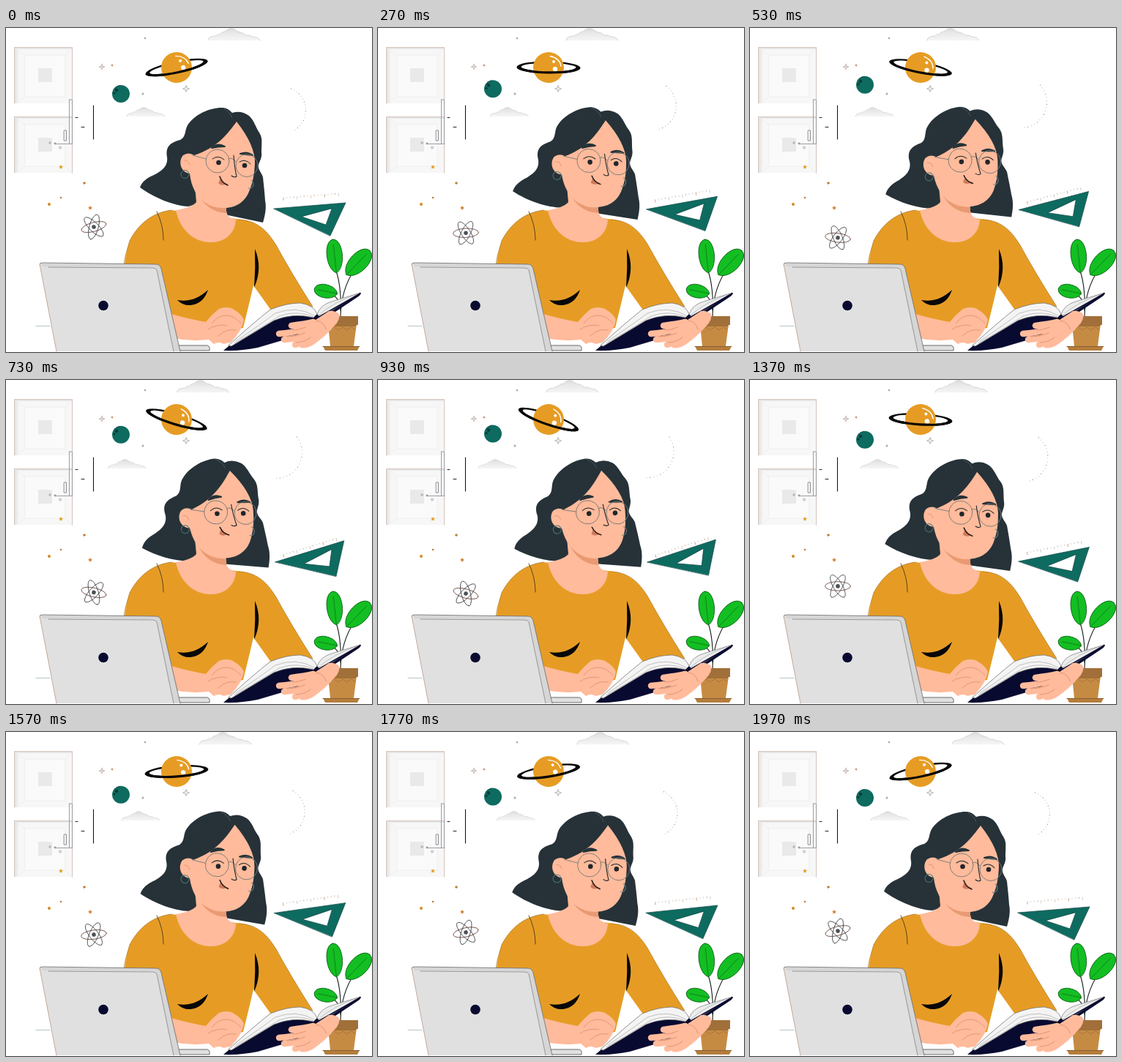
Write an HTML page with a canvas that moves like this. It is 500 by 443 pixels and loops after 2.01 s.

```html
<!DOCTYPE html>
<html lang="en">
<head>
<meta charset="utf-8">
<title>Study time</title>
<style>
html, body { margin: 0; width: 100%; height: 100%; overflow: hidden; background: #fff; }
canvas { display: block; width: 500px; height: 443px; }
</style>
</head>
<body>
<canvas id="stage" width="500" height="443"></canvas>
<script>
const c = document.getElementById('stage').getContext('2d');
const LOOP = 2010, STEP = 100 / 3, TAU = Math.PI * 2, DEG = Math.PI / 180;
const HAIR = '#263238', SKIN = '#ffbb9b', SHADE = '#e99a72', ORANGE = '#e69c24';
const TEAL = '#0e6b60', GREEN = '#13be22', NAVY = '#090a30', INK = '#20262b';

// time, swing, slope per ms
const KEYS = [
  [0, 0, .0015], [270, .415, .0014], [530, .737, .001],
  [930, 1, 0], [1170, .76, -.00125], [1570, .25, -.00095], [1970, 0, -.0003]
];

function swing(t) {
  let i = 0;
  while (i < KEYS.length - 2 && t > KEYS[i + 1][0]) i++;
  const [t0, a, m] = KEYS[i], [t1, b, n] = KEYS[i + 1];
  const d = t1 - t0, u = Math.min(1, (t - t0) / d), v = 1 - u;
  return a * v * v * (1 + 2 * u) + b * u * u * (3 - 2 * u) + d * u * v * (m * v - n * u);
}

function shape(d, fill, stroke, w = 1) {
  const p = new Path2D(d);
  if (fill) { c.fillStyle = fill; c.fill(p, 'evenodd'); }
  if (stroke) { c.strokeStyle = stroke; c.lineWidth = w; c.stroke(p); }
}
const line = (d, color, w) => shape(d, null, color, w);

function oval(x, y, rx, ry, rot, fill, stroke, w = 1) {
  c.beginPath();
  c.ellipse(x, y, rx, ry, rot * DEG, 0, TAU);
  if (fill) { c.fillStyle = fill; c.fill(); }
  if (stroke) { c.strokeStyle = stroke; c.lineWidth = w; c.stroke(); }
}
const dot = (x, y, r, fill, stroke, w) => oval(x, y, r, r, 0, fill, stroke, w);

function at(x, y, angle, draw) {
  c.save();
  c.translate(x, y);
  c.rotate(angle * DEG);
  draw();
  c.restore();
}

function star(x, y, r, n, inner, fill, stroke) {
  c.beginPath();
  for (let i = 0; i < n * 2; i++) {
    const a = i * Math.PI / n - Math.PI / 2, q = i % 2 ? r * inner : r;
    c.lineTo(x + q * Math.cos(a), y + q * Math.sin(a));
  }
  c.closePath();
  c.fillStyle = fill;
  c.fill();
  if (stroke) { c.strokeStyle = stroke; c.lineWidth = .6; c.stroke(); }
}

function frame(y) {
  at(11, y, 0, () => {
    const g = c.createLinearGradient(0, 0, 7, 0);
    g.addColorStop(0, '#dedede');
    g.addColorStop(1, '#f7f7f7');
    c.fillStyle = g;
    c.fillRect(0, 0, 80, 77);
    c.fillStyle = '#e6e6e6';
    c.fillRect(0, 0, 80, 3);
    line('M.5 77V.5H79.5V77', '#d3c3bc', 1);
    shape('M15 11H70V68H15Z', '#fafafa', '#efefef');
    line('M3 3L15 11M78 3L70 11M3 76L15 68M78 76L70 68', '#f0f0f0', 1);
    c.fillStyle = '#e9e9e9';
    c.fillRect(33, 29, 19, 19);
  });
}

function scenery() {
  frame(26);
  frame(121);
  line('M119.5 106V152', '#15171c', 1.1);
  line('M86.5 98V158M86.5 98H90.5V158M67 158.5H91', '#9a9da2', 1);
  line('M95 122.5H98M103 135.5H107', '#222', 1);
  line('M79.5 140H82.5V154H79.5Z', '#8e9194', 1);
  dot(60, 157, 1.2, null, '#999', .8);
  dot(67, 158, 1.4, '#999');
  dot(74, 163.5, 1.5, null, '#999', .8);
  line('M41 407.5H60', '#b8c5c8', 1);
  star(131, 53, 4, 4, .4, '#e5d9d5', '#b5a39d');
  star(246, 83, 4.5, 4, .4, '#eee', '#98908d');
  star(145, 51, 2, 4, .5, '#c98d78');
  dot(190, 14, 1.3, '#a8a8a8');
  dot(187, 90, 1.5, '#aaa');
  star(75, 190, 3, 5, .5, '#e3a01f');
  star(115, 246, 3, 5, .5, '#d4822d');
  dot(107, 212, 1.8, '#bd823d');
  dot(59, 241, 2, '#d18a26');
  dot(75, 232, 1.3, '#bf7b33');
}

function cloud(x, y, sx, sy) {
  c.save();
  c.translate(x, y);
  c.scale(sx, sy);
  const g = c.createLinearGradient(0, 0, 0, 17);
  g.addColorStop(0, '#dcdcdc');
  g.addColorStop(.5, '#ebebeb');
  g.addColorStop(1, '#f5f5f5');
  shape('M0 17Q0 12 8 11Q10 12 13 9Q16 10 19 6Q24 5 27 2Q33 -1 38 3Q41 6 45 6Q49 7 52 10Q57 9 61 12Q69 12 71 17Z', g);
  line('M0 17Q0 12 8 11Q10 12 13 9Q16 10 19 6Q24 5 27 2Q33 -1 38 3Q41 6 45 6Q49 7 52 10Q57 9 61 12Q69 12 71 17', '#c9c7c5', .7);
  c.restore();
}

function ring() {
  c.beginPath();
  c.ellipse(0, 0, 43.5, 8.5, 0, 0, TAU);
  c.ellipse(0, -.4, 37.5, 5.7, 0, 0, TAU);
  c.fillStyle = '#070707';
  c.fill('evenodd');
}

function planets(p) {
  at(233, 54, -12 + 31 * p, () => {
    ring();
    dot(0, 0, 21, ORANGE);
    line('M2 -15.5Q15 -13 17 -2', '#fff', 1.4);
    dot(7, -8, 2, '#fff');
    dot(9, 2, 3.2, '#fff');
    c.beginPath();
    c.rect(-45, 0, 90, 12);
    c.clip();
    ring();
  });
  at(157, 90 - 16.5 * p, 0, () => {
    dot(0, 0, 12, TEAL);
    dot(-6, -5, 2.2, '#083d3b');
    dot(-9, -1, 1.6, '#083d3b');
    line('M-9 -7A12 12 0 0 1 -2 -11.5', '#174c4a', 1);
  });
}

function atom(p) {
  at(120, 272 + 20 * p, -15 + 30 * p, () => {
    for (let i = 0; i < 3; i++) oval(0, 0, 17.5, 6.2, i * 60, null, i ? '#4b4d53' : '#765249', .9);
    dot(0, 0, 2.8, '#4e5056');
  });
}

function tools(p) {
  at(366 + 2 * p, 247 + 2 * p, -13.6 * p, () => {
    shape('M0 0L98 -8L77 37ZM38 11L71 22L79 0Z', TEAL, '#174a49', .7);
    const off = -14 + 8 * p;
    for (let i = 0; i < 17; i++) {
      const x = 13 + i * 4.7, y = off - x * .08;
      line(`M${x} ${y}v${i % 4 ? 1 : 3.5}`, i % 3 ? '#c9c0b9' : '#c39473', .8);
    }
  });
  at(377 - 9 * p, 112 - 15 * p, 35 * p, () => {
    const r = 32 + 4 * p;
    for (let i = 0; i < 17; i++) {
      const a = (-68 + i * 7.8) * DEG;
      c.fillStyle = i % 3 ? '#b9b9b9' : '#777';
      c.fillRect(r * Math.cos(a), r * Math.sin(a), 1, 1);
    }
  });
}

function plant() {
  line('M457 396Q459 356 451 332M457 394Q458 356 477 329M457 386Q456 368 443 363', '#15201a', 1.1);
  const leaf = (x, y, rx, ry, a) => at(x, y, a, () => {
    shape(`M0 ${-ry}C${rx * 1.3} ${-ry} ${rx * 1.4} ${ry * .7} 0 ${ry}C${-rx * 1.4} ${ry * .7} ${-rx * 1.3} ${-ry} 0 ${-ry}Z`, GREEN, '#12651c', .9);
    line(`M0 ${-ry * .7}V${ry}`, '#0b7a18', .8);
  });
  leaf(449, 312, 10.5, 23, -6);
  leaf(481, 321, 12, 23, 44);
  leaf(437, 360, 9, 16, -78);
  shape('M440 405H479L475 435H443Z', '#c58b43');
  line('M443 412L448 409L454 413L460 409L466 413L472 409L477 412', '#a1703a', .8);
  shape('M438 394H481V406H438Z', '#a1703a');
  line('M441 407H478', '#7c552c', 1);
  shape('M433 435H483L480 441H436Z', '#b47d3c');
  line('M433 435.5H483', '#8a5f30', 1);
}

function body() {
  shape('M226 249C197 253 180 270 169 291Q162 311 160 345L220 395L276 404L300 415L324 410Q332 378 338 352L365 390L419 381Q391 337 369 297C355 274 341 263 314 261Z', ORANGE);
  line('M226 249C197 253 180 270 169 291Q162 311 160 330M318 262C341 263 355 274 369 297Q391 337 419 381', '#b37c27', .8);
  line('M206 251Q215 269 215 290', '#4b3a22', .9);
  shape('M340 302Q351 328 339 355Q341 328 340 302Z', '#080808');
  shape('M234 372Q257 376 276 358Q270 377 252 379Q242 380 234 372Z', '#080808');
}

function hair() {
  shape('M297 109C281 108 258 117 248 133C244 140 246 149 238 153C223 157 218 163 220 176C222 190 211 196 204 200C192 205 186 210 183 218C202 232 229 243 249 244L270 238L294 254L351 266C354 256 356 246 354 236C353 222 352 214 351 204C349 197 344 194 345 187C347 181 350 177 349 170C349 157 351 151 346 143C341 136 339 126 332 120Q321 112 309 116Q304 110 297 109Z', HAIR);
  line('M297 110Q306 114 309 123', '#56616a', .7);
}

function neck() {
  shape('M257 205L260 238Q253 246 232 249C237 274 255 293 280 293C300 293 313 280 314 262Q302 260 301 250L298 225Z', SKIN);
  shape('M261 224Q274 242 301 245L301 253Q274 252 261 224Z', SHADE);
}

function face() {
  shape('M315 128C304 143 289 164 257 174Q249 169 242 174C235 182 238 197 251 199C253 218 261 231 271 238Q283 247 298 246C316 246 328 236 333 221Q339 207 340 186Q341 161 315 128Z', SKIN);
  line('M244 181Q249 180 251 187', SHADE, 1);
  dot(244.5, 200, 5.5, null, '#47767a', 1);
  line('M335 208A5 6 0 1 1 331 219', '#6b8588', 1);
  shape('M281 164Q289 156 299 162Q290 162 281 164Z', HAIR, HAIR, 2);
  shape('M320 172Q329 168 337 174Q329 173 320 172Z', HAIR, HAIR, 2);
  line('M282 179Q290 173 298 180M319 183Q327 178 334 186', INK, 1);
  dot(290.5, 184, 3.3, INK);
  dot(326, 188, 3.3, INK);
  dot(289, 182, 16, null, '#777978', .9);
  oval(329, 188, 15, 15.5, 0, null, '#777978', .9);
  line('M304 179Q309 176 314 183M255 174L273 179', '#777978', .9);
  line('M311 174Q312 190 315 203Q312 205 308 202', INK, 1.1);
  shape('M293 206Q296 213 303 213Q294 217 290 212Z', '#cf795d');
  line('M292 203Q295 212 303 215', '#231714', 1.5);
}

function laptop() {
  shape('M224 434H275Q279 435 278 441H222Z', '#e0e0e0', '#4b4b4b', .8);
  shape('M46 323Q46 321 50 321L205 323Q210 323 212 329L238 442H69Z', '#e0e0e0');
  shape('M205 323Q210 323 212 329L238 442H229L206 330Q205 327 200 327L50 326L47 322Z', '#d6d6d6');
  line('M46 323Q46 321 50 321L205 323Q210 323 212 329L238 442', '#666', .8);
  line('M58 327L200 328Q205 328 206 331L229 442', '#777', .7);
  line('M46 323L69 442', '#c5a99c', 1);
  dot(133, 379.5, 6.8, NAVY);
}

function reading() {
  shape('M222 390Q250 398 273 402Q282 391 291 384Q301 380 310 384Q322 391 325 399Q322 415 307 430L297 432Q291 428 284 432L277 426Q254 429 228 424Z', SKIN);
  line('M281 404Q290 392 302 393Q313 394 321 404M276 412Q289 404 302 407M290 421Q302 410 314 413', '#dc8e70', .8);
  shape('M297 441L322 420L366 394L424 392L484 362Q486 364 480 368L438 396L398 421L344 437Q320 442 297 441Z', NAVY);
  shape('M304 434Q337 404 361 385Q383 376 402 376Q421 379 425 391L420 396Q392 389 366 400L308 435Z', '#f4f4f4', '#666', .7);
  line('M314 428Q347 406 368 390Q397 379 421 393M312 431Q347 411 373 394Q397 385 420 395', '#aaa', .7);
  shape('M425 391Q430 378 445 374L484 362L430 396Z', '#ededed', '#777', .7);
  line('M427 393Q446 375 482 363', '#aaa', .7);
  line('M424 397L484 363', NAVY, 1.8);
  line('M390 407Q407 405 420 402M373 418Q390 417 406 412M380 426Q396 425 410 420M395 433Q405 431 414 426', SKIN, 8.5);
  shape('M398 408Q412 403 423 399L441 387Q449 386 455 391Q457 399 448 408Q436 422 420 433Q410 439 402 437Z', SKIN);
  line('M391 413Q401 413 409 409M384 422Q397 422 408 417M396 430Q408 430 416 423M424 400Q435 402 437 412', '#d98b6d', .8);
}

function render(t) {
  const p = swing(t);
  c.fillStyle = '#fff';
  c.fillRect(0, 0, 500, 443);
  scenery();
  cloud(276 - 46 * p, 0, 1, 1);
  cloud(165 - 28 * p, 108, .73, .76);
  planets(p);
  atom(p);
  tools(p);
  plant();
  body();
  const head = draw => at(279, 200, -7.7 * p, () => { c.translate(-279, -200); draw(); });
  head(hair);
  neck();
  head(face);
  reading();
  laptop();
}

c.lineCap = c.lineJoin = 'round';
const start = performance.now();
function tick(now) {
  const t = Math.max(0, now - start) % LOOP;
  const n = Math.min(59, Math.floor((t + 4) / STEP));
  render(n * STEP);
  requestAnimationFrame(tick);
}
render(0);
requestAnimationFrame(tick);
</script>
</body>
</html>
```
